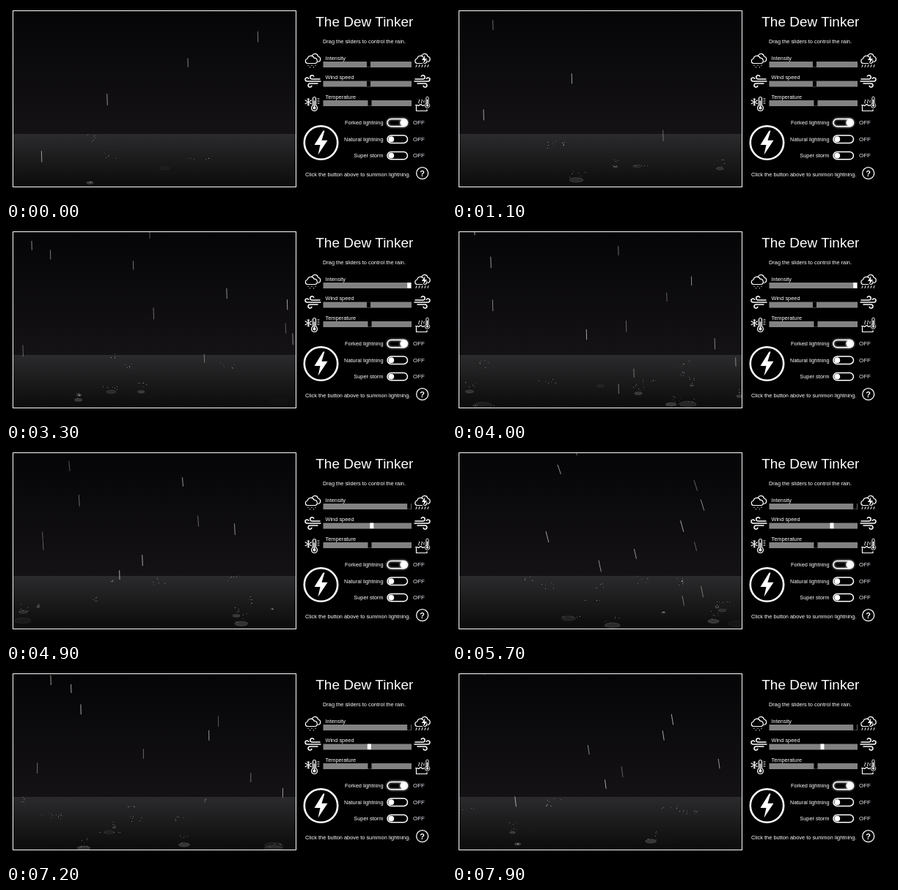
Write an HTML page with a canvas that moves like this. It is 600x264 px and loops after 8000 ms.

```html
<!DOCTYPE html>
<html lang="en">
<head>
<meta charset="utf-8">
<title>Rain controls</title>
<style>
  html, body { margin: 0; width: 600px; height: 264px; overflow: hidden; background: #000; }
  canvas, svg { position: absolute; left: 0; top: 0; display: block; }
  svg { font-family: "Liberation Sans", Arial, sans-serif; font-size: 7.4px; fill: #fff; }
  .line { fill: none; stroke: #fff; stroke-width: 1.2; stroke-linecap: round; stroke-linejoin: round; }
  .thin { stroke-width: 1; }
  .bar { fill: #828282; }
  .knob { fill: #000; }
  .knob.held { fill: #fff; }
  .off { font-size: 8px; fill: #e4e4ee; }
  .glow { filter: drop-shadow(0 0 1.5px #fff); }
</style>
</head>
<body>
<canvas id="scene" width="600" height="264"></canvas>
<svg width="600" height="264" viewBox="0 0 600 264">
  <defs>
    <g id="clouds" class="line">
      <path d="M3.500 13.500a3.300 3.300 0 0 1 .2-6.500a4.700 4.700 0 0 1 9-.8a3.800 3.800 0 0 1 1.800 7.300z"/>
      <path d="M10 2.500a4.300 4.300 0 0 1 8 1.500a3.700 3.700 0 0 1 .3 7.300"/>
    </g>
    <g id="wind" class="line" style="stroke-width:1.5">
      <path d="M21 5.500H10.500a2.600 2.600 0 1 1 2.200-3.800"/>
      <path d="M22 8.500H3.500a2.500 2.500 0 1 1 2.200-3.700"/>
      <path d="M18 11.500H7.500a2.500 2.500 0 1 0 2.400 3.200"/>
    </g>
    <g id="gauge" class="line">
      <path d="M-2 11V1.500a2 2 0 0 1 4 0V11a4 4 0 1 1-4 0z"/>
      <path d="M0 5V14" stroke-width="1.600"/>
      <circle cy="14.500" r="1.500" fill="#fff"/>
    </g>
    <rect id="pill" class="line" x="520" y="-5.200" width="27.500" height="10.400" rx="5.200" style="stroke-width:1.5"/>
    <rect id="bar" class="bar" x="432.500" width="120.500" height="8"/>
  </defs>

  <rect x="9.500" y="6.500" width="386" height="241" fill="none" stroke="#fff"/>

  <text x="488.800" y="28" font-size="19" text-anchor="middle">The Dew Tinker</text>
  <text x="432" y="51">Drag the sliders to control the rain.</text>

  <text x="435.500" y="73.500">Intensity</text>
  <text x="435.500" y="100">Wind speed</text>
  <text x="435.500" y="126.500">Temperature</text>
  <use href="#bar" y="76"/>
  <use href="#bar" y="102.500"/>
  <use href="#bar" y="129"/>
  <rect class="knob" id="rainKnob" x="-2.500" y="76" width="5" height="7.600"/>
  <rect class="knob" id="windKnob" x="-2.500" y="102.500" width="5" height="7.600"/>
  <rect class="knob" x="493.500" y="129" width="5" height="7.600"/>

  <!-- light and heavy rain -->
  <use href="#clouds" x="407.500" y="65"/>
  <path class="line" d="M412 81v.2M417 81v.2M422 81v.2M414.500 83.500v.2M419.500 83.500v.2"/>
  <use href="#clouds" x="557" y="65"/>
  <path class="line thin" d="M560 80.500l-1 3M564 80.500l-1 3M568 80.500l-1 3M572 80.500l-1 3M576 80.500l-1 3"/>
  <path d="M571.500 67l-4.500 7h3.200l-1.700 5.500l5.500-7.500h-3.200z" stroke="#000" stroke-width="1.500" paint-order="stroke"/>

  <use href="#wind" x="407" y="94.500"/>
  <use href="#wind" transform="translate(579 94.500) scale(-1 1)"/>

  <!-- cold and hot -->
  <g class="line" transform="translate(412.300 131.300)">
    <path d="M0-4.800V4.800M-4.200-2.400L4.200 2.400M-4.200 2.400L4.200-2.400"/>
    <path class="thin" d="M-1.500-4.200L0-2.800L1.500-4.200M-1.500 4.200L0 2.800L1.500 4.200"/>
  </g>
  <use href="#gauge" x="420.500" y="125"/>
  <path class="line thin" d="M425 127h2M425 130h2M425 133h2"/>
  <path class="line" d="M558.500 135.500h2.500q1.500 1.800 3 0t3 0t3 0M559.500 136v7.500h14.500v-2"/>
  <path class="line thin" d="M563 133q-1-1.500.3-2.800t.2-2.200M566.700 133q-1-1.500.3-2.800t.2-2.200M570 132q-.8-1.500.2-2.800"/>
  <use href="#gauge" transform="translate(574.500 124.500) scale(.8)"/>

  <!-- switches -->
  <g text-anchor="end">
    <text x="514.500" y="162.200">Forked lightning</text>
    <text x="514.500" y="184.700">Natural lightning</text>
    <text x="514.500" y="207.200">Super storm</text>
  </g>
  <g class="glow"><use href="#pill" y="159.600"/><circle cx="542" cy="159.600" r="4.500"/></g>
  <use href="#pill" y="182.200"/><circle cx="525.300" cy="182.200" r="3.900"/>
  <use href="#pill" y="204.600"/><circle cx="525.300" cy="204.600" r="3.900"/>
  <text class="off" x="555" y="162.400">OFF</text>
  <text class="off" x="555" y="184.900">OFF</text>
  <text class="off" x="555" y="207.400">OFF</text>

  <circle class="line" cx="429.500" cy="187" r="22.700" style="stroke-width:2.6"/>
  <path d="M432.500 170.500L420.500 190H428.500L425.500 203.500L438.500 183.800H430.500L434.500 170.500z"/>
  <text x="408" y="233">Click the button above to summon lightning.</text>
  <circle class="line" cx="567.700" cy="228.700" r="8" style="stroke-width:1.3"/>
  <text x="567.700" y="232.700" font-size="11" font-weight="bold" text-anchor="middle">?</text>
</svg>

<script>
const LOOP = 8000, STEP = 100;
const SPEED = 0.6, TOP = -10;         // px per ms, spawn height
const RIPPLE = 450, SPRAY = 350;      // lifetimes in ms
const MID = 494.5, MAX = 549.7;       // slider positions

// Slider drags as [time, x] points
const rainPath = [[2000, MID], [2400, 502], [2700, 525], [3200, MAX]];
const windPath = [[4600, MID], [5400, 506], [5700, 518], [6000, 518], [6300, 507], [6600, 487], [7900, 505]];

let seed = 71;
function rand(a = 0, b = 1) {
  seed = (seed * 1664525 + 1013904223) >>> 0;
  return a + (b - a) * seed / 4294967296;
}

function along(path, t) {
  const next = path.findIndex(([time]) => time > t);
  if (next < 0) return path[path.length - 1][1];
  if (next === 0) return path[0][1];
  const [t0, x0] = path[next - 1], [t1, x1] = path[next];
  return x0 + (x1 - x0) * (t - t0) / (t1 - t0);
}

// Each drop keeps the lean of the wind it was born in and ends in a splash
function makeDrop(start) {
  const len = rand(12, 16), ground = rand(180, 246);
  const lean = 0.03 + (along(windPath, start) - MID) * 0.015;
  const landX = rand(12, 393);
  const spray = Array.from({ length: 6 }, () => ({ dx: rand(-16, 16), up: rand(2, 15), glow: rand(.2, .6) }));
  return { start, len, ground, lean, landX, spray, glow: rand(.35, .75),
           end: start + (ground - len - TOP) / SPEED };
}

const drops = [];
for (let t = -900; t < LOOP;) {
  const perSecond = 11 + 20 * (along(rainPath, t) - MID) / (MAX - MID);
  t += rand(.5, 1.5) * 1000 / perSecond;
  drops.push(makeDrop(t));
}

const ctx = document.getElementById("scene").getContext("2d");
const rainKnob = document.getElementById("rainKnob");
const windKnob = document.getElementById("windKnob");

function shade(y0, y1, from, to) {
  const g = ctx.createLinearGradient(0, y0, 0, y1);
  g.addColorStop(0, from);
  g.addColorStop(1, to);
  ctx.fillStyle = g;
  ctx.fillRect(10, y0, 385, y1 - y0);
}

function drawRipple(d, k) {
  const rx = (d.ground - 200) * .3 * (.35 + .85 * k);
  ctx.globalAlpha = Math.min(1, 1.7 * (1 - k));
  ctx.beginPath();
  ctx.ellipse(d.landX, d.ground, rx, rx * .33, 0, 0, 7);
  ctx.fillStyle = "#343435";
  ctx.strokeStyle = "#4e4e4f";
  ctx.lineWidth = .8;
  ctx.fill();
  ctx.stroke();
}

function drawSpray(d, k) {
  ctx.fillStyle = "#ccc";
  for (const p of d.spray) {
    ctx.globalAlpha = p.glow;
    ctx.fillRect(Math.round(d.landX + p.dx * k), Math.round(d.ground - p.up * 4 * k * (1 - k)), 1, 1);
  }
}

function drawStreak(d, t) {
  const y = TOP + (t - d.start) * SPEED;
  const x = d.landX - d.lean * (d.ground - y);
  ctx.globalAlpha = d.glow;
  ctx.strokeStyle = "#ddd";
  ctx.lineWidth = 1;
  ctx.beginPath();
  ctx.moveTo(x, y);
  ctx.lineTo(x + d.lean * d.len, y + d.len);
  ctx.stroke();
}

function drawDrop(d, t) {
  if (t < d.start) return;
  if (t < d.end) return drawStreak(d, t);
  const age = t - d.end;
  if (age < RIPPLE && d.ground > 216) drawRipple(d, age / RIPPLE);
  if (age < SPRAY) drawSpray(d, age / SPRAY);
}

function setKnob(el, x, held) {
  el.setAttribute("transform", `translate(${x} 0)`);
  el.classList.toggle("held", held);
}

function draw(t) {
  ctx.save();
  ctx.clearRect(0, 0, 600, 264);
  ctx.beginPath();
  ctx.rect(10, 7, 385, 240);
  ctx.clip();
  shade(7, 175, "#050406", "#141215");
  shade(175, 248, "#2b2a2c", "#0b0b0b");
  drops.forEach(d => drawDrop(d, t));
  ctx.restore();
  setKnob(rainKnob, along(rainPath, t), t >= 2000 && t < 4300);
  setKnob(windKnob, along(windPath, t), t >= 4600);
}

let shown = -1;
function tick() {
  const t = Math.floor(performance.now() % LOOP / STEP) * STEP;
  if (t !== shown) draw(shown = t);
  requestAnimationFrame(tick);
}
tick();
</script>
</body>
</html>
```
